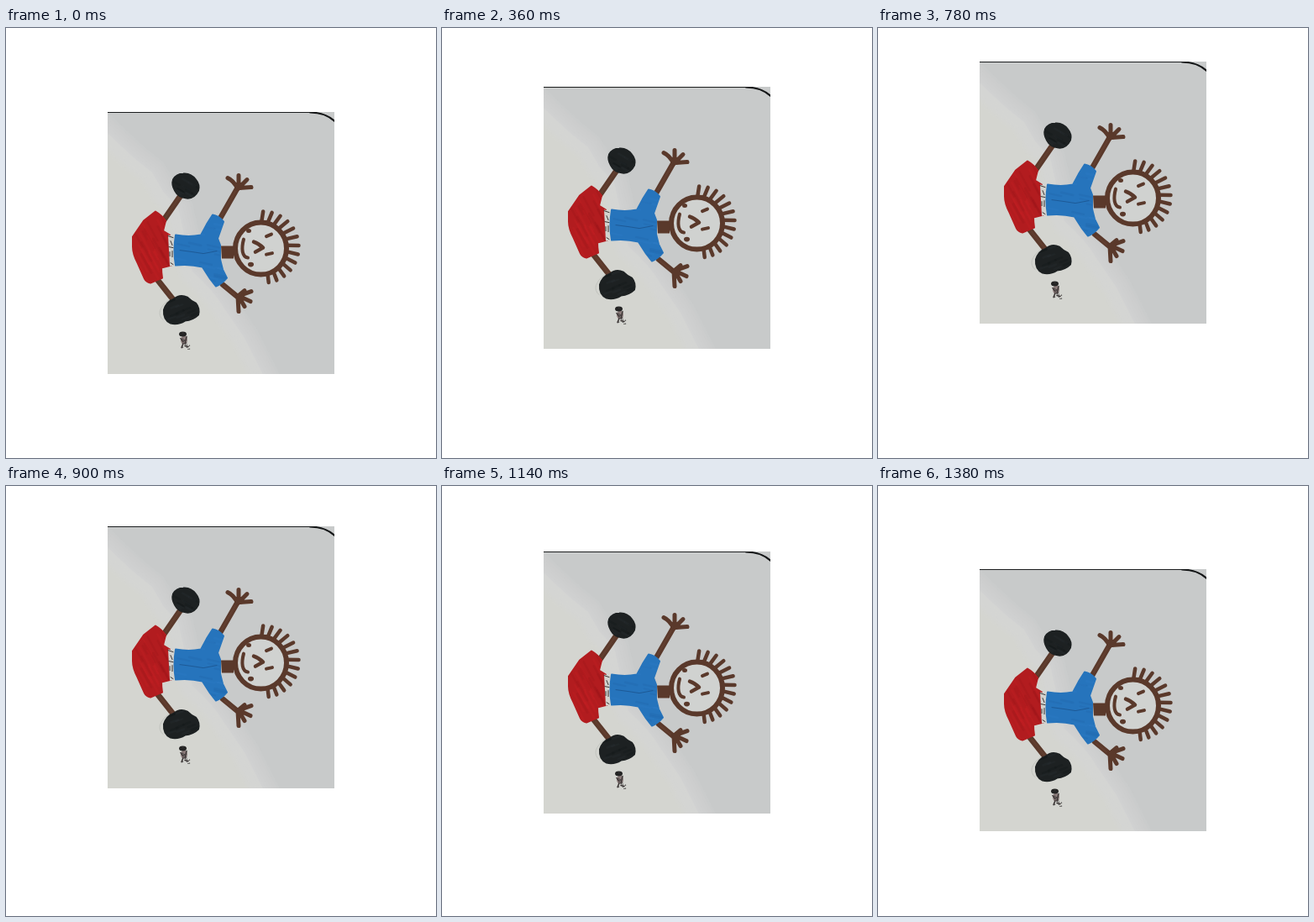
An HTML page with a canvas that plays this animation: 512x512 px, repeating every 1440 ms.

```html
<!DOCTYPE html>
<html lang="en">
<head>
<meta charset="utf-8">
<title>Floating drawing</title>
<style>
html, body { margin: 0; width: 100%; height: 100%; overflow: hidden; background: #fff; }
canvas { display: block; width: 100vmin; height: 100vmin; }
</style>
</head>
<body>
<canvas id="stage" width="512" height="512"></canvas>
<script>
const stage = document.getElementById('stage').getContext('2d');
const LOOP = 1440, STEP = 60;
const BROWN = '#5a392b', RED = '#b21c1f', BLUE = '#2674bc', BLACK = '#1d2122';
const COOL = '#c8caca', WARM = '#d4d5d0';

// The drawing is painted once, then moved as a single sheet.
const sheet = document.createElement('canvas');
sheet.width = 270;
sheet.height = 312;
const c = sheet.getContext('2d');
c.translate(-121, -100);
c.lineCap = c.lineJoin = 'round';

let seed = 7;
const random = () => (seed = seed * 16807 % 2147483647) / 2147483647;

function stroke(path, color, width) {
  c.strokeStyle = color;
  c.lineWidth = width;
  c.stroke(new Path2D(path));
}

function shape(path, fill, width = 0) {
  c.fillStyle = fill;
  c.fill(new Path2D(path));
  if (width) stroke(path, fill, width);
}

function dot(x, y, rx, ry, color) {
  c.fillStyle = color;
  c.beginPath();
  c.ellipse(x, y, rx, ry, 0, 0, Math.PI * 2);
  c.fill();
}

// Soft pen streaks kept inside an outline.
function streaks(path, x, y, w, h, dx, dy, colors, count) {
  c.save();
  c.clip(new Path2D(path));
  c.globalAlpha = 0.16;
  for (let i = 0; i < count; i++) {
    const px = x + random() * w, py = y + random() * h;
    stroke(`M${px} ${py}l${dx} ${dy}`, colors[i % colors.length], 2 + random());
  }
  c.restore();
}

function paper() {
  c.fillStyle = COOL;
  c.fillRect(121, 100, 270, 312);
  const light = 'M100 105Q138 142 154 156L174 172 188 196 205 214 222 290Q248 313 260 334L284 369 315 430H100Z';
  shape(light, WARM);
  c.globalAlpha = 0.12;
  for (let width = 6; width <= 36; width += 6) stroke(light, WARM, width);
  c.globalAlpha = 1;
  c.fillStyle = '#1b1d1e';
  c.fillRect(121, 100, 247, 1);
  stroke('M362 100.5C375 100.5 384 104 392 111.5', '#141617', 2);
}

function shorts() {
  const path = 'M178 218Q185 222 190 229L187 241 195 246 197 282 185 285Q185 291 186 297L172 303Q167 302 165 298L157 280Q151 269 151 260V248L164 229Z';
  shape(path, RED, 2);
  streaks(path, 148, 220, 40, 65, 12, 22, ['#8c1218', '#d22425'], 26);
}

function shirt() {
  shape('M193 246L201 247 200 283 195 283Z', '#d2d2ce');
  const path = 'M202 246Q218 249 232 246L239 233 246 222Q253 223 259 230L252 250 255 258 255 275 258 287 263 297Q257 304 250 307L243 298 234 284Q218 280 202 282Q199 264 202 246Z';
  shape(path, BLUE, 2);
  streaks(path, 200, 224, 55, 80, 14, 3, ['#1c5795', '#3586cb'], 30);
  stroke('M207 264L222 266 235 268 251 265', '#1d5a97', 1);
  stroke('M193 247L199 249M196 253L198 258M194 260L199 261M195 266V271M198 265V272M196 279L199 281', '#3a3433', 1);
}

function limbs() {
  stroke('M208 199L188 228M181 300L200 324', BROWN, 7);
  stroke('M255 226L275 191M258 305L275 319', BROWN, 6.5);
  stroke('M276 191Q271 181 264 178M277 190L277 175M278 189L287 180M278 190L292 189', BROWN, 5);
  stroke('M276 319L277 337M277 319L284 331M278 319L291 325M278 318L292 313M278 317L284 312', BROWN, 5);
  dot(278, 188, 5, 4, BROWN);
  dot(279, 320, 5, 5, BROWN);
  c.globalAlpha = 0.3;
  stroke('M206 201L190 225M183 302L198 321M257 222L273 194M260 307L272 317', '#7b5140', 1.5);
  c.globalAlpha = 1;
}

function feet() {
  const top = 'M199 180Q203 173 211 173 220 172 226 180 231 186 229 193 224 203 215 202 205 201 201 193 197 186 199 180Z';
  const bottom = 'M188 335Q191 325 200 322 207 316 216 320 221 325 226 327 231 333 229 341 223 347 213 348 205 353 196 351 187 347 188 335Z';
  stroke('M194 323Q176 337 187 347', '#c0c2bd', 1);
  for (const path of [top, bottom]) shape(path, BLACK, 2);
  streaks(top, 199, 175, 25, 24, 7, 4, ['#363c3d', '#0b0e0f'], 14);
  streaks(bottom, 188, 320, 36, 28, 8, -3, ['#363c3d', '#0b0e0f'], 18);
}

function head() {
  const x = 303.5, y = 262, rx = 30.5, ry = 31;
  shape('M256 259H271V274H257Z', BROWN);
  dot(x, y, rx, ry, '#d0d2d0');
  c.strokeStyle = BROWN;
  c.lineWidth = 6;
  c.beginPath();
  c.ellipse(x, y, rx, ry, 0, 0, Math.PI * 2);
  c.stroke();
  // Hairs grow longest toward the upper right.
  for (let i = 0; i < 13; i++) {
    const a = -1.55 + i * 0.238, reach = 42.5 + 3 * Math.cos(a + 0.6);
    const tip = a + 0.04;
    stroke(`M${x + rx * Math.cos(a)} ${y + ry * Math.sin(a)}L${x + reach * Math.cos(tip)} ${y + reach * Math.sin(tip)}`, BROWN, 4.5);
  }
  stroke('M310 247.5L316 245M310 269L317 267.5', BROWN, 4);
  stroke('M295 254Q301 256 306 261L297 266', BROWN, 4.5);
  stroke('M283 251C280 262 281 272 288 273', BROWN, 4);
  dot(289, 241, 3, 2.5, BROWN);
  dot(291.5, 281, 3.5, 2.8, BROWN);
}

function smallMark() {
  dot(212, 371, 4, 5, '#8c7c7b');
  dot(210.5, 364, 4.5, 3, '#242424');
  stroke('M208 369L211 373M215 367L213 375M211 375L209 380M213 378L217 379', '#3b3635', 1.5);
  for (let i = 0; i < 12; i++) dot(206 + random() * 13, 361 + random() * 21, 0.8, 0.7, '#393737');
}

paper();
c.translate(0, 0.6);
for (const paint of [limbs, shorts, shirt, feet, head, smallMark]) paint();

const start = performance.now();

function frame() {
  const elapsed = (performance.now() - start) % LOOP;
  const time = Math.floor(elapsed / STEP) * STEP;
  const top = Math.round(69.9 + 30.5 * Math.cos(2 * Math.PI * time / LOOP));
  stage.fillStyle = '#fff';
  stage.fillRect(0, 0, 512, 512);
  stage.drawImage(sheet, 121, top);
  requestAnimationFrame(frame);
}
frame();
</script>
</body>
</html>
```
